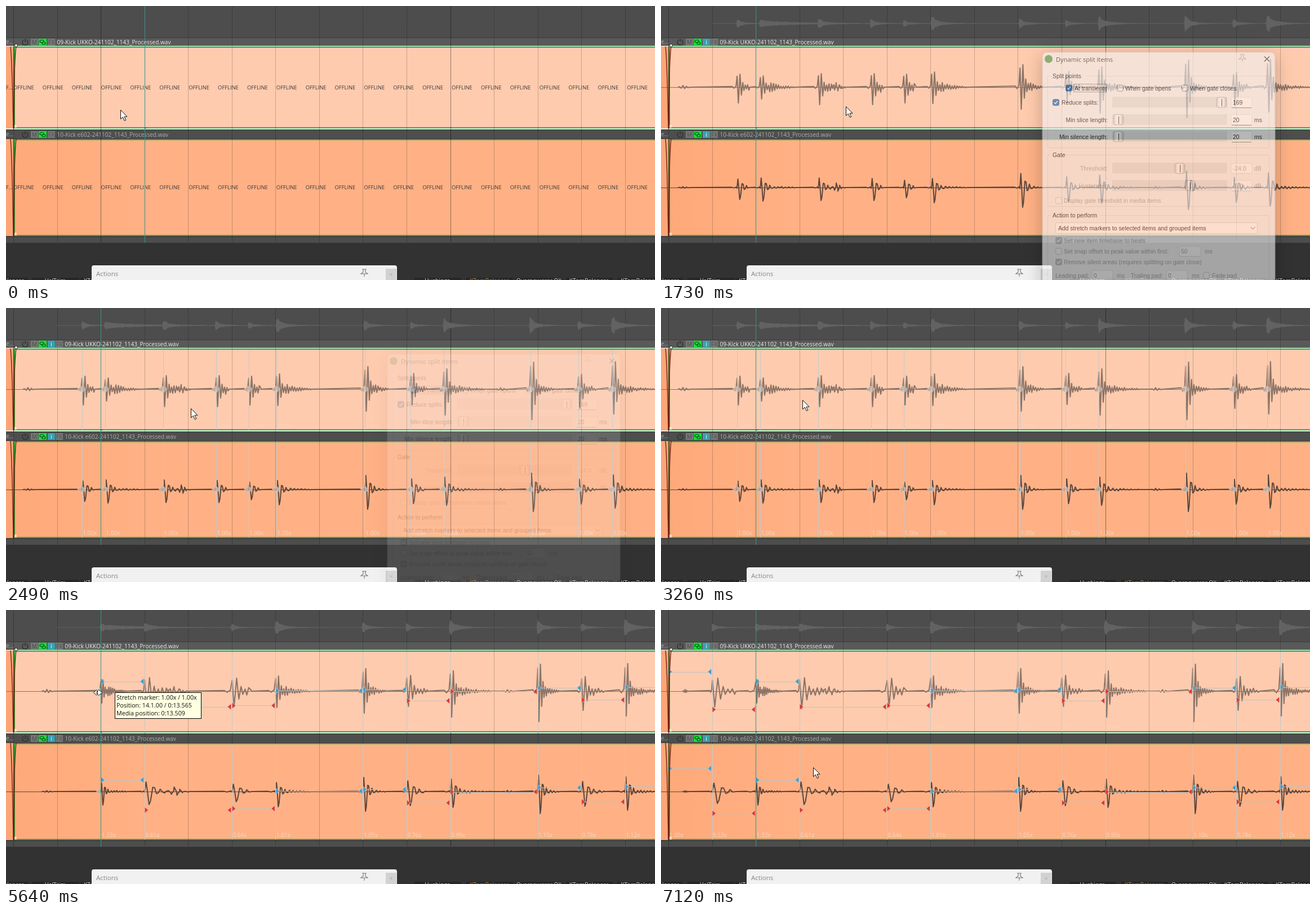
Recreate the animation shown at these times as an HTML page. Size 1152 px wide and 486 px high, loop 8 s.

```html
<!DOCTYPE html>
<html lang="en">
<head>
<meta charset="utf-8">
<title>Quantizing drum items</title>
<style>
html, body { margin: 0; width: 100%; height: 100%; overflow: hidden; background: #323232; }
svg { display: block; width: 1152px; height: 486px; }
text { font-family: "Open Sans", "Noto Sans", sans-serif; white-space: pre; }
#dialog text { font-family: "Liberation Sans", Arial, sans-serif; }
#dialog text.cap { font-family: "Open Sans", "Noto Sans", sans-serif; }
#panel { filter: drop-shadow(0 6px 16px rgba(0, 0, 0, .38)); }
rect { shape-rendering: crispEdges; }
rect[rx] { shape-rendering: auto; }
</style>
</head>
<body>
<svg id="stage" viewBox="0 0 1152 486" xmlns="http://www.w3.org/2000/svg"></svg>
<script>
const LOOP = 8000;
const GRID = 77.55;
const gridX = n => 13 + GRID * n;
const rows = [
  { top: 72, bottom: 217, mid: 144, scale: 1, ink: '#8b7467', low: false },
  { top: 236, bottom: 408, mid: 322, scale: 1.19, ink: '#5c463c', low: true }
];

// Drum hits: position, upper row up/down, lower row up/down, tail length
const hits = [
  [134.7, 23, 28, 15, 21, 22], [176, 20, 21, 17, 24, 62], [279, 24, 31, 17, 23, 48],
  [373, 24, 31, 16, 23, 22], [430.5, 23, 28, 13, 18, 20], [480, 27, 29, 16, 27, 62],
  [636.9, 40, 39, 25, 35, 42], [718.3, 28, 27, 19, 25, 28], [777, 36, 46, 22, 28, 72],
  [931, 48, 54, 29, 39, 42], [1016, 26, 34, 18, 26, 32], [1076.3, 49, 44, 26, 33, 76]
];
const bumps = [[38, 3, 1.5], [310, 8, 8], [877, 2.5, 2]];
const hitX = hits.map(h => h[0]);

const rect = (x, y, w, h, fill, more = '') =>
  `<rect x="${x}" y="${y}" width="${w}" height="${h}" fill="${fill}" ${more}/>`;
const text = (x, y, s, size, fill, more = '') =>
  `<text x="${x}" y="${y}" font-size="${size}" fill="${fill}" ${more}>${s}</text>`;
const path = (d, stroke, w = 1, more = '') =>
  `<path d="${d}" fill="none" stroke="${stroke}" stroke-width="${w}" ${more}/>`;
const group = (id, body, more = '') => `<g id="${id}" ${more}>${body}</g>`;
const random = seed => () => (seed = (seed * 16807) % 2147483647) / 2147483647;

// Warps: matching lists of media positions and stage positions
const snapSrc = [-20.5, ...hitX, 1163.2];
const snapTo = n => ({ src: snapSrc, dst: n.map(gridX) });
const plainX = [13, ...hitX, 1163.2];
const warps = {
  plain: { src: plainX, dst: plainX },
  snapped: snapTo([0, 2, 2, 3, 5, 5, 6, 8, 9, 10, 12, 13, 14, 15]),
  moved: snapTo([0, 1, 2, 3, 5, 5, 6, 8, 9, 10, 12, 13, 14, 15])
};
function segments({ src, dst }) {
  return src.slice(1).map((s1, i) => ({ i, s0: src[i], s1, d0: dst[i], d1: dst[i + 1] }))
    .filter(s => s.d1 - s.d0 > 1)
    .map(s => ({ ...s, rate: (s.s1 - s.s0) / (s.d1 - s.d0) }));
}

const upperShape = [[-8, -.05], [-5, .06], [-1.5, -.08], [.4, -.85], [2.6, 1], [5.5, -1], [8, .5],
  [10.5, -.36], [12.5, .2], [15, -.16]];
const lowerShape = [[-9, -.03], [-5, .03], [-1, -.06], [.2, .05], [1.8, -1], [3.2, -.1], [5, 1], [6.5, .75],
  [9, -.45], [11, -.4], [13, .16], [15, .1], [17, -.24], [19.5, .04]];

function wavePoints(low) {
  const rnd = random(low ? 77 : 41), pts = [];
  const shape = low ? lowerShape : upperShape;
  hits.forEach(([x, u1, d1, u2, d2, tail]) => {
    const up = low ? u2 : u1, down = low ? d2 : d1;
    shape.forEach(([dx, k]) => pts.push([x + dx, k * (k < 0 ? up : down)]));
    let sign = 1;
    for (let d = low ? 22 : 17; d < tail; d += low ? 3.2 : 2.2) {
      const size = (low ? 3 : 6) * Math.exp(-(d - 17) / (tail / 2.6));
      pts.push([x + d, sign * size * (.5 + rnd())]);
      sign = -sign;
    }
    pts.push([x + Math.max(tail, 23), 0]);
  });
  bumps.forEach(([x, a, b]) => {
    const size = low ? b : a;
    [[-8, 0], [-5, -.2], [-2, .6], [1, -1], [4, .8], [7, -.5], [10, .25], [14, 0]]
      .forEach(([dx, k]) => pts.push([x + dx, k * size]));
  });
  return pts.sort((a, b) => a[0] - b[0]);
}

function wave(warp, row) {
  const pts = wavePoints(row.low), out = [];
  segments(warp).forEach(s => pts.forEach(([x, y]) => {
    if (x >= s.s0 && x < s.s1)
      out.push((s.d0 + (x - s.s0) / s.rate).toFixed(1) + ' ' + (row.mid + y).toFixed(1));
  }));
  return path('M' + out.join('L'), row.ink, row.low ? 2 : 2.1, 'stroke-linejoin="round"');
}

// Folder overview: decaying filled envelope
function overview(warp) {
  const rnd = random(9), top = [], bottom = [];
  const amps = [8, 9, 8, 8, 6, 13, 9, 7, 14, 14, 8, 17];
  const segs = segments(warp).filter(s => s.i > 0);
  for (let x = 90; x <= 1152; x += 1.5) {
    let size = .6;
    segs.forEach(s => {
      const d = x - s.d0;
      if (d < -1) return;
      const i = s.i - 1, len = i === 1 ? 60 : 9 + hits[i][5] / 9;
      size += amps[i] * (i === 1 ? .6 : .75) * Math.exp(-d / len) + (d < 5 ? amps[i] * .25 : 0);
    });
    size = Math.min(17, size * (.65 + .4 * rnd()));
    top.push(x + ' ' + (31 - size).toFixed(1));
    bottom.unshift(x + ' ' + (31 + size).toFixed(1));
  }
  return `<path d="M${top.join('L')}L${bottom.join('L')}Z" fill="#626262"/>`;
}

function markers(warp, row) {
  const segs = segments(warp), plain = warp === warps.plain, loose = warp === warps.snapped;
  const free = s => s.i === 0 && (plain || loose);
  const tri = (x, y, dir, fill) =>
    `<path d="M${x} ${y - 5.5}L${x + dir * 6.5} ${y}L${x} ${y + 5.5}Z" fill="${fill}" stroke="#d9d0c9" stroke-width=".7"/>`;
  let lines = '', arrows = '', labels = '';
  segs.forEach(s => {
    const l = Math.log(s.rate);
    const still = plain || free(s);
    const y = row.mid - (still ? 0 : 47 * row.scale * Math.tanh(1.35 * l));
    const fill = still ? '#b9aca3' : l > 0 ? '#3d9dd3' : '#e2352f';
    const gap = row.low && Math.abs(s.d0 - gridX(3)) < 1;
    if (!still && !gap) lines += rect(s.d0 + 3, Math.round(y), s.d1 - s.d0 - 6, 1, '#bcc3c2');
    if (!free(s)) {
      if (s.i) lines += rect(Math.round(s.d0), row.top + 2, 1, row.bottom - row.top - 3, '#c3c9cb');
      arrows += tri(s.d0 + .5, y, 1, fill);
      const rate = s.i ? s.rate.toFixed(2) : '1.00';
      labels += text(s.d0 + 1.5, row.bottom - (row.low ? 5 : 4), rate + 'x', 10, '#f1e4db', `opacity="${row.low ? .75 : .3}"`);
    }
    arrows += tri(s.d1 - 1, y, -1, fill);
  });
  return lines + arrows + labels;
}

const dotted = (x, y0, y1, color) => path(`M${x + .5} ${y0}V${y1}`, color, 1, 'stroke-dasharray="1 1"');

function backdrop() {
  let s = rect(0, 0, 1152, 420, '#4d4d4d') + rect(0, 420, 1152, 66, '#323232');
  s += rect(0, 56, 1152, 1, '#3c3c3c') + rect(0, 57, 1152, 14, '#595959') + rect(0, 70, 1152, 1, '#8c8c8c');
  s += rect(0, 71, 1152, 148, '#f3eeea') + rect(0, 72, 1152, 145, '#ffcbae') + rect(0, 219, 1152, 1, '#333');
  s += rect(0, 220, 1152, 16, '#4e4e4e') + rect(0, 235, 1152, 1, '#3a3a3a');
  s += rect(0, 236, 1152, 172, 'url(#warm)') + rect(0, 408, 1152, 2, '#3d3d3d');
  rows.forEach(r => {
    s += rect(0, r.top, 13, r.bottom - r.top, '#fca576');
    s += rect(14, r.top, 1138, 2, '#27b33a') + rect(14, r.bottom - 2, 1138, 2, '#27b33a');
  });
  for (let n = 1; n < 15; n++) {
    const x = Math.round(gridX(n)), bar = n === 2 || n === 10;
    s += dotted(x, 0, 420, bar ? 'rgba(0,0,0,.85)' : 'rgba(0,0,0,.42)');
  }
  s += rect(13, 0, 1, 420, '#383838');
  return s;
}

function fades() {
  return rows.map(r => {
    const h = r.bottom - r.top, p = k => r.top + h * k;
    return rect(13, r.top, 1, h, '#30451f') + rect(14, r.top, 2, h, '#2c9a32') +
      path(`M8 ${r.top}C11 ${p(.2)} 12 ${p(.6)} 13 ${r.bottom}`, '#7c1512', 1.3) +
      path(`M18 ${r.top}C15 ${p(.15)} 14 ${p(.5)} 14 ${r.bottom}`, '#7c1512', 1.3) +
      rect(15, r.bottom - 6, 4, 5, 'rgba(255,235,220,.7)');
  }).join('') + '<circle cx="18" cy="70" r="2.5" fill="#fff" stroke="#222"/>';
}

function header(y, name, color, online) {
  const button = (x, s, fill, ink) => rect(x, y - 6, 13, 12, fill) +
    text(x + 6.5, y + 4, s, 10, ink, 'text-anchor="middle"');
  const fx = online ? 88 : 74;
  return text(0, y + 3, 'e...', 10, '#a5a5a5') +
    path(`M31.5 ${y - 4}A5 5 0 1 0 36.5 ${y - 4}M34 ${y - 6}V${y}`, '#303030', 1.4) +
    button(44, 'M', '#777', '#4a4a4a') + rect(58, y - 6, 14, 12, '#12e234') +
    path(`M62 ${y - 3.5}h3a2 2 0 0 1 0 4h-3a2 2 0 0 1 0 -4M66 ${y}h2a2 2 0 0 1 0 4h-2a2 2 0 0 1 0 -4`, '#0b4a14', 1.2) +
    (online ? button(74, 'i', '#3a9fae', '#fff') : '') + button(fx, 'FX', '#777', '#4f4f4f') +
    text(fx + 16.5, y + 4, name, 10.05, color);
}
const headers = online =>
  header(64, '09-Kick UKKO-241102_1143_Processed.wav', '#ececec', online) +
  header(228, '10-Kick e602-241102_1143_Processed.wav', '#adadad', online);

function offline() {
  return [148, 325].map(y => {
    let s = text(0, y, 'F...', 9.4, '#4a3b33');
    for (let i = 0; i < 22; i++) s += text(13 + i * 51.87, y, 'OFFLINE', 9.4, '#3d3836');
    return s;
  }).join('');
}

function footer() {
  const slots = [[-3, 'KTomBalancer'], [87.5, 'VolTrim'], [173, 'KTomBalancer'], [765.5, 'Hushings'],
    [858, 'KTomBalancer', '#c98642'], [946, 'Overpowerer QX'], [1034.5, 'KTomBalancer'], [1126, 'KTomBalancer']];
  let s = slots.map(([x, name, color = '#d2d2d2']) => rect(x - 41, 482, 83, 4, '#272727') +
    text(x, 490.5, name, 10.4, color, 'text-anchor="middle"')).join('');
  s += '<path d="M152 486V464a4 4 0 0 1 4-4H690a4 4 0 0 1 4 4V486Z" fill="#f1f1f1"/>';
  s += text(160, 479, 'Actions', 11.5, '#858585') + pin(636, 473, '#777');
  return s + rect(674, 466, 19, 20, '#d2d2d2') + path('M681.5 474l4 4m0-4l-4 4', '#aaa');
}
function pin(x, y, color) {
  return path(`M${x - 4} ${y - 6}h8m-6 0v5l-4 3h12l-4-3v-5m-2 8v5`, color, 1.1);
}

function dialog() {
  const F = 10.4, ink = '#111', dim = '#9b9b9b';
  const t = (x, y, s, color = ink, more = '') => text(x, y + 4, s, F, color, more);
  const check = (x, y, fill, edge) => rect(x - 5.5, y - 5.5, 11, 11, fill, `rx="2.5" stroke="${edge}"`);
  const tick = (x, y, fill) => check(x, y, fill, fill) + path(`M${x - 3} ${y}l2 2.5 4-5`, '#fff', 1.3);
  const field = (x, y, w, v, color = ink) => rect(x, y - 9, w, 18, '#fbfbfb', 'rx="2" stroke="#dedede"') +
    rect(x + 1, y + 9, w - 2, 1, color === ink ? '#777' : '#dcdcdc') + t(x + 3, y, v, color);
  const box = (y, h, label) => rect(686.5, y + .5, 393, h, 'none', 'stroke="#dadada"') +
    rect(692, y - 3, label.length * 5 + 4, 8, '#f1f0f1') + t(695, y, label);
  const slider = (y, label, x, v, unit, color = ink) =>
    (label ? t(793, y, label, color, 'text-anchor="end"') : '') + rect(801, y - 10, 204, 19, '#dedede') +
    rect(x - 9, y - 9, 18, 18, 'url(#knob)', 'rx="4" stroke="#a9a9a9"') + rect(x, y - 6, 1, 13, '#222') +
    field(1012, y, 37, v, color) + t(1053, y, unit, color);
  let s = rect(677, 82, 413, 440, '#f1f0f1', 'rx="8" stroke="#c9c5c5"');
  s += '<circle cx="688" cy="94" r="7" fill="#3f9a4e"/>';
  s += text(701, 98.5, 'Dynamic split items', 11.1, '#222', 'class="cap"') + pin(1032, 92, '#aaa');
  s += path('M1071 89.5l9 9m0-9l-9 9', '#222', 1.2);
  s += box(124, 127, 'Split points') + tick(724, 145.5, '#0f62b5') + t(734, 145.5, 'At transients');
  s += rect(732.5, 138.5, 58, 14, 'none', 'stroke="#222" stroke-dasharray="1 1"');
  s += check(815, 145.5, '#fafafa', '#777') + t(824, 145.5, 'When gate opens');
  s += check(930, 145.5, '#fafafa', '#777') + t(939, 145.5, 'When gate closes');
  s += tick(701, 171, '#0f62b5') + t(711, 171, 'Reduce splits:') + slider(171, '', 995, '169', '');
  s += slider(201.5, 'Min slice length:', 812, '20', 'ms') + slider(231.5, 'Min silence length:', 812, '20', 'ms');
  s += box(264, 91, 'Gate') + slider(288, 'Threshold:', 921, '-24.0', 'dB', dim);
  s += slider(318.5, 'Hysteresis:', 939, '-6.0', 'dB', dim);
  s += check(706, 345, '#f4f4f4', '#c6c6c6') + t(715, 345, 'Display gate threshold in media items', dim);
  s += box(371, 140, 'Action to perform') + rect(700.5, 384.5, 358, 19, '#fdfdfd', 'rx="2" stroke="#cfcfcf"');
  s += t(705, 394, 'Add stretch markers to selected items and grouped items') + path('M1046.5 392l4 4 4-4', '#555');
  s += tick(706, 416, '#bcbcbc') + t(715, 416, 'Set new item timebase to beats', dim);
  s += check(706, 435, '#f4f4f4', '#c6c6c6') + t(715, 435, 'Set snap offset to peak value within first:', dim);
  s += field(920, 435, 38, '50', dim) + t(965, 435, 'ms', dim);
  s += tick(706, 454, '#bcbcbc') + t(715, 454, 'Remove silent areas (requires splitting on gate close)', dim);
  s += t(700, 478, 'Leading pad:', dim) + field(765, 478, 37, '0', dim) + t(809, 478, 'ms', dim);
  s += t(834, 478, 'Trailing pad:', dim) + field(897, 478, 37, '0', dim) + t(942, 478, 'ms', dim);
  s += check(968, 478, '#f4f4f4', '#c6c6c6') + t(978, 478, 'Fade pad', dim);
  return group('panel', s);
}

function tip(x, y, w, lines) {
  return rect(x + .5, y + .5, w, lines.length * 14.5 + 2, '#ffffe1', 'stroke="#000"') +
    lines.map((s, i) => text(x + 3, y + 12.5 + i * 14.4, s, 10.7, '#111')).join('');
}
const stretchTip = (x, a, b, pos) => tip(x, 146, 153,
  [`Stretch marker: ${a}x / ${b}x`, `Position: ${pos}`, 'Media position: 0:13.509']);

const both = fn => rows.map(fn).join('');
const snapLine = x => rect(x, 0, 1, 420, '#3d8a86');
const arrow = 'M0 0V16L3.8 12.6 6.8 19 9.3 17.9 6.4 11.7H11.5Z';
const moveIcon = 'M18 12.5l3.5 4h-2.3v3.3h3.3v-2.3l4 3.5-4 3.5v-2.3h-3.3v3.3h2.3l-3.5 4-3.5-4h2.3v-3.3h-3.3v2.3l-4-3.5 4-3.5v2.3h3.3v-3.3h-2.3z';

let scene = `<defs>
<linearGradient id="warm" gradientUnits="userSpaceOnUse" x1="13" x2="250"><stop offset="0" stop-color="#ffa97a"/><stop offset="1" stop-color="#ffb185"/></linearGradient>
<linearGradient id="knob"><stop offset="0" stop-color="#c9c9c9"/><stop offset=".3" stop-color="#fafafa"/><stop offset=".7" stop-color="#f0f0f0"/><stop offset="1" stop-color="#b5b5b5"/></linearGradient>
</defs>` + backdrop();
scene += group('axis', rect(0, 144, 1152, 1, '#8a7266') + rect(0, 322, 1152, 1, '#5a463c'));
for (const key in warps) scene += group(key, overview(warps[key]) + both(r => wave(warps[key], r)));
scene += group('ticks', hitX.map(x => path(`M${x - 5} 144.5h11M${x} 141v7`, '#4fae4f', 1.2, 'opacity=".7"')).join(''));
for (const key in warps) scene += group(key + 'Marks', both(r => markers(warps[key], r)));
scene += group('dashes', hitX.map(x => path(`M${Math.round(x) - .5} 73V216`, '#3aa5a0', 1, 'stroke-dasharray="6 4"')).join(''));
scene += fades() + group('off', offline() + headers(false)) + group('on', headers(true));
scene += group('play', rect(0, 0, 1, 420, '#3b9487') + rect(0, 216, 3, 1, '#222'));
scene += group('snapStart', snapLine(13) + rect(0, 57, 1152, 1, '#3d8a86') + rect(0, 219, 1152, 1, '#3d8a86'));
scene += group('snapBeat', snapLine(90)) + footer() + group('dialog', dialog());
scene += group('tipMove', tip(183, 164.5, 143, ['Position: 13.4.00 / 0:13.304', 'End: 37.1.75 / 0:37.760']));
scene += group('tipHold', stretchTip(193, '1.00', '1.00', '14.1.00 / 0:13.565'));
scene += group('tipDrag', stretchTip(129, '1.99', '0.53', '13.4.50 / 0:13.435'));
scene += group('cursor',
  group('arrow', `<path d="${arrow}" fill="#fff" stroke="#111"/>`) +
  group('move', `<path d="${moveIcon}" fill="#111" stroke="#fff" stroke-width=".7"/>`) +
  group('stretch', '<path d="M-3 -4.5L-8 0L-3 4.5L-1 2.7V-2.7ZM1 -5L-4 0L1 5L7.5 0Z" fill="#fff" stroke="#111"/>'));
document.getElementById('stage').innerHTML = scene;

const shown = {
  off: [0, 390], on: [390, LOOP], axis: [390, LOOP],
  plain: [780, 3910], snapped: [3910, 5760], moved: [5760, LOOP],
  ticks: [780, 1730], dashes: [1850, 2370],
  plainMarks: [2370, 3910], snappedMarks: [3910, 5760], movedMarks: [5760, LOOP],
  snapStart: [4610, 4970], snapBeat: [5760, 6280],
  tipMove: [4610, 4970], tipHold: [5640, 5760], tipDrag: [5760, 6280],
  move: [4490, 5090], stretch: [5390, 6400]
};
const cursorAt = [
  [0, 203, 184], [780, 222, 183], [903, 262, 181], [1027, 304, 179], [1150, 330, 179], [1300, 328, 178],
  [2860, 293, 171], [3010, 252, 163], [3260, 251, 163], [3660, 266, 169], [3910, 266, 163], [4190, 231, 169],
  [4340, 159, 171], [4490, 157, 168], [4610, 155, 165], [4730, 154, 164], [4970, 158, 158], [5090, 162, 154],
  [5240, 161, 152], [5390, 163, 146], [5760, 104, 146], [5880, 99, 146], [6400, 112, 158], [6520, 140, 184],
  [6640, 178, 217], [6760, 214, 246], [6880, 243, 268], [7000, 263, 279], [7120, 270, 279]
];
const dialogAlpha = [[0, 0], [1730, .6], [1850, 1], [2370, .5], [2490, .15], [2610, 0]];
const at = (steps, t) => steps.findLast(s => s[0] <= t);
const el = id => document.getElementById(id);
const show = (id, on) => { el(id).style.display = on ? '' : 'none'; };

function render(t) {
  for (const id in shown) show(id, t >= shown[id][0] && t < shown[id][1]);
  show('arrow', t < shown.stretch[0] || t >= shown.stretch[1]);
  const [, x, y] = at(cursorAt, t), alpha = at(dialogAlpha, t)[1];
  el('cursor').setAttribute('transform', `translate(${x + .5} ${y + .5})`);
  el('play').setAttribute('transform', `translate(${t < 520 ? 246 : 168} 0)`);
  show('dialog', alpha > 0);
  el('dialog').style.opacity = alpha;
}

const start = performance.now();
function tickFrame() {
  render((performance.now() - start) % LOOP);
  requestAnimationFrame(tickFrame);
}
tickFrame();
</script>
</body>
</html>
```
